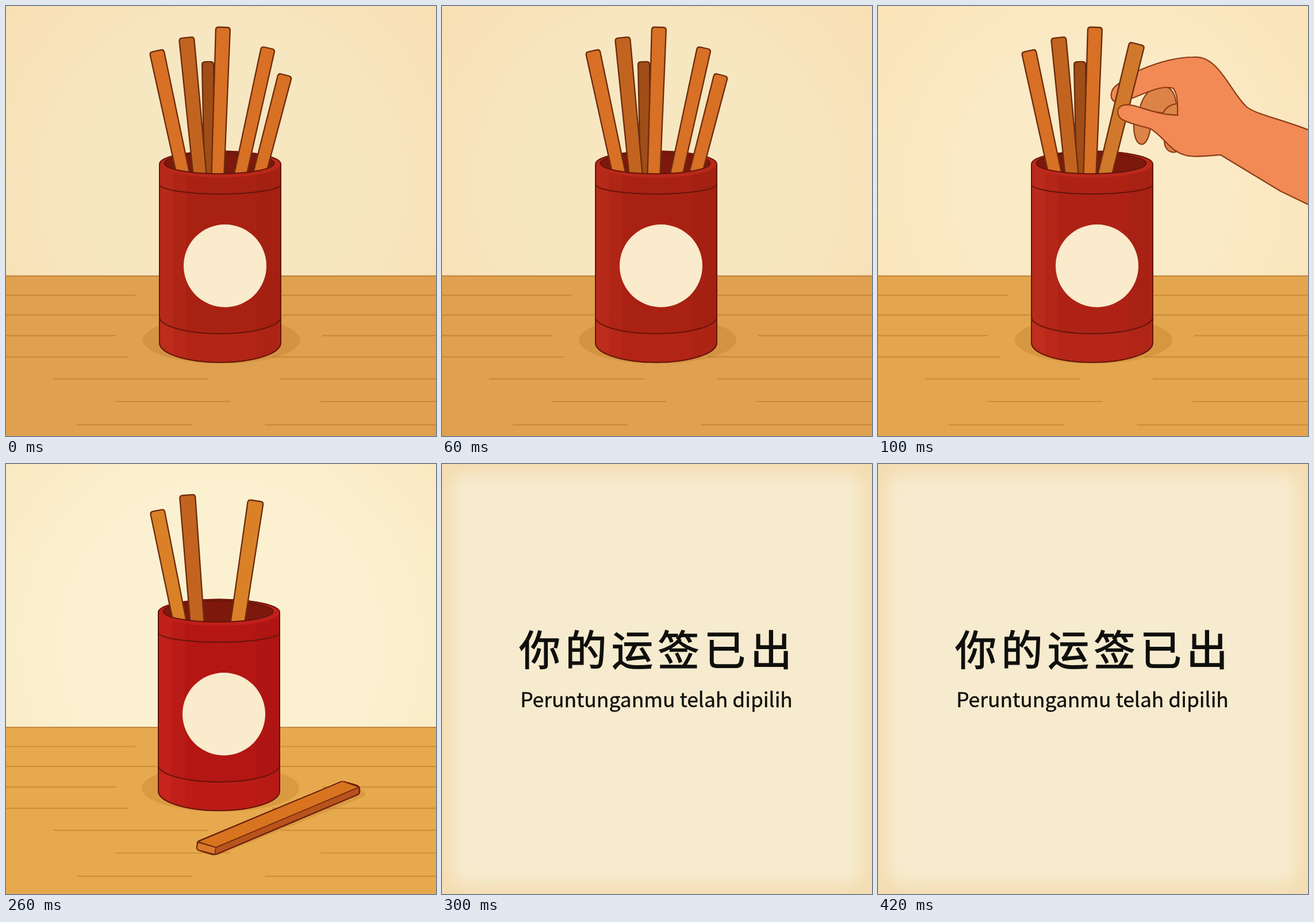
Write an HTML page that moves like this. It is 748 px wide and 748 px high and loops after 500 ms.

```html
<!DOCTYPE html>
<html lang="id">
<head>
<meta charset="utf-8">
<title>Fortune sticks</title>
<style>
  html, body { margin: 0; width: 100%; height: 100%; overflow: hidden; background: #f8e8c4; }
  svg { display: block; width: 100vw; height: 100vh; }
  .scene { opacity: 0; }
  .stick { stroke: #6b2c0c; stroke-width: 2.3; }
  .ink { fill: none; stroke: #65150a; stroke-width: 2; }
  .grain { stroke: #a5600f; stroke-width: 2.2; opacity: .35; }
  .shadow { fill: #a5600f; opacity: .2; }
  .skin { fill: #f28a56; stroke: #8c3d16; stroke-width: 2.2; stroke-linejoin: round; stroke-linecap: round; }
  .shade { fill: #dc8447; }
  .sheet { fill: #f6ebce; filter: blur(14px); }
  text { font-family: "Noto Sans CJK SC", "Noto Sans CJK", sans-serif; fill: #0f0f0d; stroke: #0f0f0d; }
  .zh { font-size: 72px; font-weight: 500; letter-spacing: 8.5px; stroke-width: 1.4; }
  .latin { font-size: 35.4px; text-anchor: middle; stroke-width: .4; }
</style>
</head>
<body>
<svg id="stage" viewBox="0 0 748 748"></svg>
<script>
const LOOP = 500;
const STARTS = [0, 100, 200, 300];
const RIM_Y = 292;

const themes = {
  warm:  { wall: '#f7e7c1', edge: '#f9dfb4', wood: '#dfa04f', red: '#a92112' },
  light: { wall: '#faeac5', edge: '#fbe4b8', wood: '#e3a54e', red: '#ad2215' },
  vivid: { wall: '#fbf1d1', edge: '#faeac3', wood: '#e7a94e', red: '#b41613' }
};
const amber = '#d87026', brown = '#c26420', dark = '#a04d17', honey = '#da8128';

// A tapering stick from its rounded tip (x, y) through foot on the rim.
function stick(x, y, foot, fill = amber, width = 25) {
  const angle = Math.atan2(foot - x, RIM_Y - y) * 180 / Math.PI;
  const top = width / 2, end = top * .87, r = 5;
  return `<path class="stick" fill="${fill}" transform="translate(${x} ${y}) rotate(${-angle})"
    d="M${-end} 270L${-top} ${r}Q${-top} 0 ${r - top} 0H${top - r}Q${top} 0 ${top} ${r}L${end} 270Z"/>`;
}

function grain() {
  let d = '';
  for (let i = 0; i < 7; i++) {
    const y = 503 + 34 * i + .6 * i * i;
    const from = Math.max(0, 38 * i * Math.cos(i - 5));
    const to = from + 225 + 45 * Math.sin(2 * i);
    const next = 495 + 55 * Math.cos(2.2 * (i - 2));
    d += `M${from} ${y}H${to}M${next} ${y}H748`;
  }
  return `<path class="grain" d="${d}"/>`;
}

function backdrop(name, dy = 0) {
  const { wall, edge, wood } = themes[name];
  return `<radialGradient id="wall-${name}" gradientUnits="userSpaceOnUse" cx="374" cy="310" r="480">
      <stop offset=".5" stop-color="${wall}"/><stop offset="1" stop-color="${edge}"/>
    </radialGradient>
    <rect width="748" height="748" fill="url(#wall-${name})"/>
    <g transform="translate(0 ${dy})">
      <rect y="469.5" width="748" height="300" fill="${wood}"/>
      <path d="M0 469.5H748" stroke="#b4742f" stroke-width="1.4"/>
      ${grain()}
    </g>`;
}

// Front half of a horizontal ring around the cup.
const ring = (y, ry) => `M267 ${y}A105.5 ${ry} 0 0 0 478 ${y}`;

function cup(name, sticks, dx = 0, dy = 0) {
  const { red } = themes[name];
  const body = `${ring(586, 34)}V275A105.5 22.5 0 0 0 267 275Z`;
  return `<g transform="translate(${dx} ${dy})">
      <ellipse class="shadow" cx="375" cy="581" rx="137" ry="41"/>
      <path d="${body}" fill="${red}"/>
      <path d="${body}" fill="url(#facets)"/>
      <path d="${ring(586, 34)}V541A105.5 29 0 0 1 267 541Z" fill="#ff4a38" opacity=".1"/>
      <ellipse cx="372.5" cy="275" rx="105.5" ry="23.5" fill="${red}"/>
      <ellipse cx="372.5" cy="275" rx="105.5" ry="23.5" fill="#ff4a38" opacity=".18"/>
      <path class="ink" d="${body}${ring(310, 17)}${ring(541, 29)}"/>
      <ellipse cx="371" cy="273.5" rx="95.5" ry="18.5" fill="#7d180c"/>
      <path class="ink" d="M275.5 273.5A95.5 18.5 0 0 1 466.5 273.5"/>
      <g clip-path="url(#mouth)">${sticks.join('')}</g>
      <path class="ink" d="M275.5 273.5A95.5 18.5 0 0 0 466.5 273.5"/>
      <circle cx="381" cy="452" r="72" fill="#f9ebcc"/>
    </g>`;
}

const defs = `<defs>
  <linearGradient id="facets">
    <stop offset=".11" stop-color="#ff5a46" stop-opacity=".15"/>
    <stop offset=".11" stop-color="#ff5a46" stop-opacity=".07"/>
    <stop offset=".22" stop-color="#ff5a46" stop-opacity=".07"/>
    <stop offset=".22" stop-opacity="0"/>
    <stop offset=".8" stop-opacity="0"/>
    <stop offset=".8" stop-opacity=".03"/>
  </linearGradient>
  <clipPath id="mouth">
    <rect width="748" height="292" y="-18.5"/>
    <ellipse cx="371" cy="273.5" rx="95.5" ry="18.5"/>
  </clipPath>
</defs>`;

const handBack = `
  <path class="skin shade" d="M446 200C443 215 447 234 454 239C462 244 470 237 474 212ZM498 236C499 250 508 256 518 254L520 240Z"/>
  <path class="skin shade" d="M455 180C460 155 474 142 491 139C510 139 520 150 520 190Z"/>
  <path class="skin shade" d="M495 188C499 178 508 171 521 170V190Z"/>
  <path class="skin" d="M411 166C402 160 405 145 415 138C427 129 438 119 452 113C484 99 518 89 548 89C565 88 575 94 585 103
    C606 122 622 158 642 176C660 190 705 197 760 220V351L700 322L596 259C575 261 555 263 543 261C518 256 502 237 480 216
    L521 190C522 165 520 150 513 143C495 137 468 150 443 160Z"/>`;

const thumb = `
  <path class="skin" d="M522 190C496 190 474 182 454 176C442 172 431 170 423 174C414 179 416 191 424 197
    C440 206 458 209 473 213C487 220 499 237 515 250C523 256 532 260 543 261"/>`;

const lyingStick = `
  <path class="shadow" d="M345 679L368 681L622 579Q630 573 618 567Z"/>
  <g stroke="#6b210c" stroke-width="2.4" stroke-linejoin="round">
    <path d="M333 661Q332 657 337 655L580 554Q584 552 589 553L610 559Q615 561 615 565V570Q615 574 610 576L368 678
      Q364 680 359 679L336 672Q332 671 332 667Z" fill="#b8531c"/>
    <path d="M334 657L580 554Q584 552 589 553L614 562L365 667Z" fill="#d8741f" stroke-width="1.4"/>
    <path d="M334 658L365 667L363 679L336 672Q332 671 332 667Z" fill="#d9792b" stroke-width="1.4"/>
  </g>`;

const slip = `
  <rect width="748" height="748" fill="#f4ddb2"/>
  <rect class="sheet" x="16" y="16" width="716" height="716" rx="30"/>
  <text class="zh" x="134" y="350">你的运签已出</text>
  <text class="latin" x="373" y="423">Peruntunganmu telah dipilih</text>`;

const standing = [
  stick(351, 97, 354, dark, 20),
  stick(262, 78, 308),
  stick(314, 55, 337, brown, 26),
  stick(377.5, 37, 368.5)
];

const scenes = [
  backdrop('warm') + cup('warm', [...standing, stick(456, 73, 408, amber, 24), stick(485.5, 120, 441, amber, 24)]),
  backdrop('light') + handBack + cup('light', [...standing, stick(450.5, 66, 395, '#d0782b', 27)]) + thumb,
  backdrop('vivid', -11.5) + cup('vivid', [
    stick(265, 98, 304.5, honey),
    stick(317.5, 71, 334.5, brown, 27),
    stick(436.5, 81, 405, honey, 27)
  ], -2, -17) + lyingStick,
  slip
];

const stage = document.getElementById('stage');
stage.innerHTML = defs + scenes.map(s => `<g class="scene">${s}</g>`).join('');

stage.querySelectorAll('.scene').forEach((scene, i) => {
  const steps = STARTS.map((start, j) => ({ offset: start / LOOP, opacity: +(i === j), easing: 'step-end' }));
  scene.animate([...steps, { offset: 1, opacity: 0 }], { duration: LOOP, iterations: Infinity });
});
</script>
</body>
</html>
```
